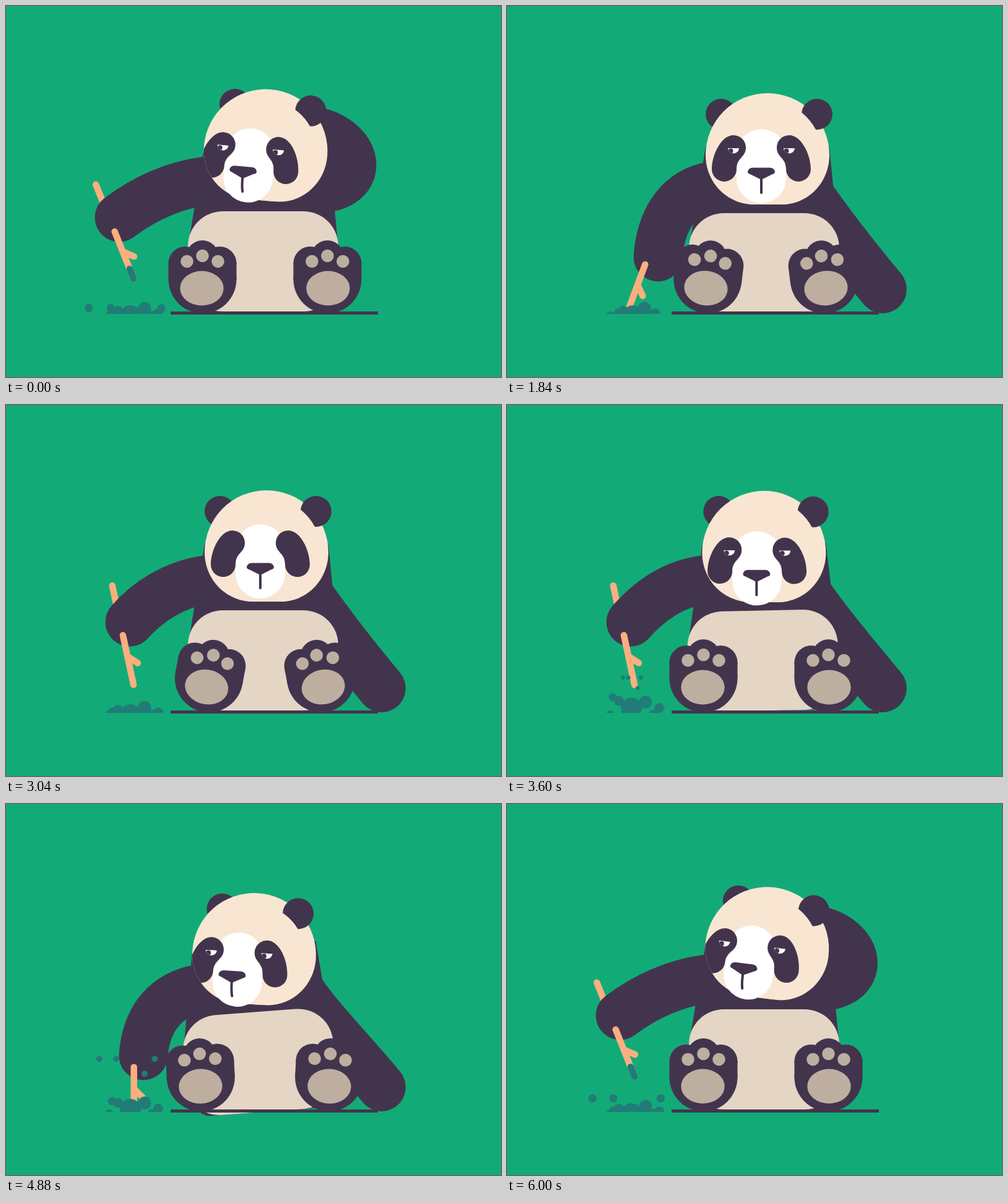
These frames come from a looping animation (800 px wide and 600 px high, 6.04 s). An HTML page with a canvas:

```html
<!DOCTYPE html>
<html>
<head>
<meta charset="utf-8">
<style>
html, body { margin: 0; width: 100%; height: 100%; overflow: hidden; background: #12ab78 }
canvas { display: block }
</style>
</head>
<body>
<canvas id="stage" width="800" height="600"></canvas>
<script>
const c = document.getElementById('stage').getContext('2d');
const LOOP = 6040, FLOOR = 498;
const GREEN = '#12ab78', DARK = '#43344d', CREAM = '#f8e6d2', BELLY = '#e5d5c5',
      PAD = '#bdaea0', WOOD = '#fbaf7f', TEAL = '#217c78';

const mix = (a, b, u) => a + (b - a) * u;
function ease(t, from, to) {
  const u = Math.min(1, Math.max(0, (t - from) / (to - from)));
  return u * u * (3 - 2 * u);
}
// Rises from a to b, holds, falls from d to e
const pulse = (t, a, b, d, e) => ease(t, a, b) - ease(t, d, e);

// The few signals that drive every part
function mood(t) {
  const rake = pulse(t, 1480, 1720, 2600, 2900);
  const down = rake + pulse(t, 690, 900, 1120, 1400) + pulse(t, 3120, 3350, 3350, 3560)
    + pulse(t, 4440, 4640, 5180, 5450);
  const scratch = 1 - pulse(t, 1350, 1800, 5160, 5680);
  const around = t > LOOP / 2 ? t - LOOP : t;
  const rub = scratch * Math.cos((around + 133) / 755 * 2 * Math.PI);
  const lean = .28 * pulse(t, 3100, 3550, 5160, 5700) + .72 * pulse(t, 4000, 4640, 5160, 5700);
  return {
    rake, down, scratch, rub, lean,
    ready: pulse(t, 2600, 2900, 3950, 4250),
    upright: pulse(t, 1350, 2100, 3120, 3570),
    turn: Math.max(scratch, lean * lean),
    lid: 1 - pulse(t, 2940, 3000, 3080, 3150)
  };
}

function fill(color, path) {
  c.fillStyle = color;
  c.fill(path);
}
function disc(color, x, y, rx, ry = rx) {
  c.fillStyle = color;
  c.beginPath();
  c.ellipse(x, y, rx, ry, 0, 0, 7);
  c.fill();
}
function line(color, width, x, y, ...to) {
  c.strokeStyle = color;
  c.lineWidth = width;
  c.lineCap = 'round';
  c.beginPath();
  c.moveTo(x, y);
  if (to.length > 2) c.bezierCurveTo(...to);
  else c.lineTo(...to);
  c.stroke();
}
function placed(x, y, angle, draw) {
  c.save();
  c.translate(x, y);
  c.rotate(angle);
  draw();
  c.restore();
}
function aboveFloor(draw) {
  c.save();
  c.beginPath();
  c.rect(0, 0, 800, FLOOR);
  c.clip();
  draw();
  c.restore();
}

const rad = Math.PI / 180;
// Relative to the middle of the seat
const torso = new Path2D('M-94-269H106L122-104Q122 0 85 0H-85Q-121 0-121-104Z');
const belly = new Path2D('M-121-105C-121-137-96-162-64-162H65C97-162 122-137 122-105V-74Q122 0 65 0H-64Q-121 0-121-74Z');
const skull = new Path2D('M-100 0A100 100 0 0 1 100 0C100 44 66 80 23 80H-21C-66 80-100 44-100 0Z');
const patch = new Path2D('M-45-50A20 20 0 0 1-25-30C-25-14-40-14-40 5A20 20 0 0 1-80 5C-80-18-65-50-45-50Z');
const muzzle = new Path2D('M-40-20A40 40 0 0 1 40-20V20A40 40 0 0 1-40 20Z');
const nose = new Path2D('M-14 2.5H14Q21 3 22 9Q22 12 18 13L2 21Q0 22-2 21L-18 13Q-22 12-22 9Q-21 3-14 2.5Z');

function trunk(m, color, path) {
  placed(415, 494 + 3 * m.down + m.lean, -4.3 * m.lean * rad, () => fill(color, path));
}
function stickArm(m) {
  const x = mix(183 + 17 * m.ready, 248 - 4 * m.rake - 26 * m.lean, m.down);
  const y = mix(342 + 9 * m.ready, 396 + 10 * m.rake + 11 * m.lean, m.down);
  const sx = 322 - 20 * m.lean, sy = 283 + (10 + 8 * m.lean) * m.down;
  const angle = mix(-.381 + .17 * m.ready, -.045 + .4 * m.rake + .045 * m.lean, m.down);
  const hold = angle + .69;
  return {
    curve: [sx, sy, sx - 50, sy + 7 + 6 * m.down,
      x + mix(44 - 15 * m.ready, 4, m.down), y - mix(33, 54, m.down), x, y],
    grip: [x - 24 * Math.sin(hold), y + 24 * Math.cos(hold), angle]
  };
}
function freeArm(m) {
  const up = m.scratch, swing = 45 * Math.sin(Math.PI * up);
  const sx = mix(490 - 11 * m.lean, 522, up), sy = mix(306, 294, up);
  const x = mix(607, 501 + 4 * m.rub, up) + swing, y = mix(458, 201 + 4 * m.rub, up);
  line(DARK, 78, sx, sy, sx + mix(32, 61, up), sy + mix(46, -14, up),
    x + mix(-54, 62, up), y + mix(-65, 15, up), x, y);
}
function foot(side, roll) {
  placed(418.5 + side * (101 - 55 * roll), 442, -side * roll, () => {
    c.scale(-side, 1);
    disc(DARK, 0, 0, 55);
    c.fillRect(-55, -27, 110, 28);
    for (const toe of [-1, 0, 1]) {
      const out = Math.abs(toe);
      disc(DARK, 28 * toe, -37 + 11 * out, 26 + out);
    }
    for (const toe of [-1, 0, 1]) disc(PAD, 25 * toe, -38 + 9 * Math.abs(toe), 10.3);
    disc(PAD, -1, 14.5, 35.2, 28);
  });
}
function eye(x, look, lid) {
  if (lid < .05) return;
  c.save();
  c.beginPath();
  c.ellipse(x, -29, 9, 8.5 * lid, 0, 0, Math.PI);
  c.clip();
  c.fillStyle = '#fff';
  c.fillRect(x - 10, -30, 20, 12);
  disc(DARK, x - look, -29 + look, 4);
  c.restore();
}
function drawHead(m) {
  const x = 421 - 20 * m.lean + m.scratch * -2.5 + 2.5 * m.rub;
  const y = 238 + 3 * (m.down + m.lean - m.scratch) - m.rub;
  const tilt = m.scratch + 9 * m.rub + 3.5 * m.lean * m.lean;
  const ear = 80 - 13 * m.turn, earY = -66 - 5 * m.turn;
  const faceX = -10 - 14.5 * m.turn, faceY = 25.5 - 10.5 * m.upright;
  const look = 4.5 + 4.5 * Math.min(0, m.rub);
  placed(x, y, tilt * rad, () => {
    disc(DARK, -75 + 19 * m.turn, earY, 25);
    fill(CREAM, skull);
    disc(DARK, ear, earY, 25);
    c.save();
    c.clip(skull);
    disc(CREAM, 0, 0, Math.hypot(ear, earY) - 15.5);
    c.restore();
    placed(faceX, faceY, 0, () => fill('#fff', muzzle));
    c.save();
    c.clip(skull);
    c.translate(faceX, faceY);
    fill(DARK, patch);
    c.scale(-1, 1);
    fill(DARK, patch);
    c.restore();
    c.translate(faceX, faceY);
    eye(-45, look, m.lid);
    eye(45, look, m.lid);
    c.translate(-9 * m.turn, 0);
    fill(DARK, nose);
    line(DARK, 4, 0, 20, 0, 28, 0, 36, 2 * m.turn, 43);
  });
}

// Clods: x, y, radius
const clods = [[171, 496, 6.5], [181, 493, 8], [201, 501, 17], [224, 489, 10.5], [246, 497, 8]];
// Bursts: start, sideways speed, upward speed, bit radius
const bursts = [[3380, .08, .38, 3.3], [4630, .216, .48, 5], [5400, .111, .367, 6.7]];

function drawSoil(t, m) {
  const push = pulse(t, 850, 960, 1150, 1420);
  const hop = pulse(t, 3340, 3450, 3580, 3850) + pulse(t, 4620, 4740, 4800, 5000);
  disc(TEAL, 167, 501, 7);
  disc(TEAL, 237 + 6 * push - 6 * m.rake, 501, 8);
  clods.forEach(([x, y, r], i) => {
    const shift = push * (15 - 2.5 * i) + m.rake * (215 - x) * .2;
    disc(TEAL, x + shift, y - hop * 24 / (1 + .6 * i), r);
  });
  for (const [start, side, up, r] of bursts) {
    const age = (t - start + LOOP) % LOOP;
    for (const way of [-1, -.5, .35, .65]) {
      const speed = way === .35 ? up * .8 : up;
      const height = speed * age - .00055 * age * age;
      if (height > -r) disc(TEAL, 205 + way * side * age, FLOOR - height, r);
    }
  }
}

function draw(t) {
  const m = mood(t), { curve, grip } = stickArm(m);
  const roll = .19 * m.upright - .05 * m.down * (1 - m.upright);
  c.fillStyle = GREEN;
  c.fillRect(0, 0, 800, 600);
  placed(...grip, () => line(WOOD, 10.5, 0, -82, 0, 0));
  trunk(m, DARK, torso);
  line(DARK, 79, ...curve);
  freeArm(m);
  trunk(m, BELLY, belly);
  c.fillStyle = DARK;
  c.fillRect(266, 494, 335, 5);
  foot(-1, roll);
  foot(1, roll);
  drawHead(m);
  aboveFloor(() => {
    placed(...grip, () => {
      line(WOOD, 10.5, 0, 0, 0, 82);
      line(WOOD, 10.5, 0, 35, 14, 49);
      if (t < 1120 || t > 5180) line(TEAL, 10.5, 0, 65, 0, 82);
    });
    drawSoil(t, m);
  });
}

const begin = performance.now();
function tick() {
  draw((performance.now() - begin) % LOOP);
  requestAnimationFrame(tick);
}
tick();
</script>
</body>
</html>
```
